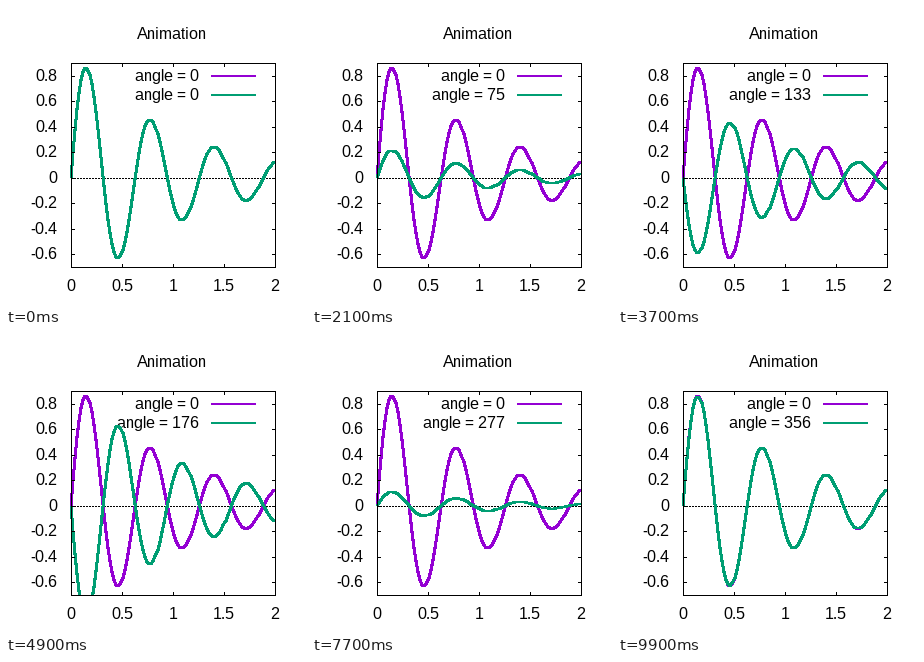
A matplotlib script for the animation above (10000 ms loop, 300x300 px).

```python
import numpy as np
import matplotlib.pyplot as plt
from matplotlib.animation import FuncAnimation
from matplotlib.patches import Rectangle

FRAMES = 100
INTERVAL = 100
PURPLE, GREEN = "#9400d3", "#009e73"
LEFT, TOP, SIDE = 65, 57, 204
RIGHT, BOTTOM = LEFT + SIDE, TOP + SIDE
TIC = 3

plt.rcParams.update({
    "font.family": "Liberation Sans",
    "text.hinting": "default",
    "text.hinting_factor": 1,
    "path.simplify": False,
})

fig = plt.figure(figsize=(3, 3), dpi=100, facecolor="white")
PX = 72 / fig.dpi  # one pixel in points

# Stage axes in pixel coordinates, y pointing down
ax = fig.add_axes([0, 0, 1, 1])
ax.set_xlim(0, 300)
ax.set_ylim(300, 0)
ax.axis("off")


def to_x(t):
    return np.round(LEFT + t * SIDE / 2)


def to_y(v):
    return np.round(TOP + (0.9 - v) * SIDE / 1.6)


def thick(xs, ys, color, **kw):
    return ax.plot(xs, ys, color=color, lw=2 * PX, aa=False, snap=False,
                   solid_capstyle="butt", solid_joinstyle="round", **kw)[0]


def thin(xs, ys):
    """One-pixel black line through pixel centres."""
    ax.plot(np.add(xs, 0.5), np.add(ys, 0.5), color="black", lw=PX, aa=False,
            snap=False, solid_capstyle="projecting",
            solid_joinstyle="miter", zorder=4)


def label(x, baseline, text, align):
    return ax.text(x, baseline, text, ha=align, va="baseline",
                   fontsize=16 * PX, color="black")


def wave_line(color, zorder):
    curve = thick(to_x(t), to_y(wave), color, zorder=zorder)
    curve.set_clip_path(Rectangle((LEFT - 1, TOP), SIDE + 2, SIDE + 1,
                                  transform=ax.transData))
    return curve


t = np.linspace(0, 2, 100)
wave = np.exp(-t) * np.sin(10 * t)

# Frame, tics and labels
thin([LEFT, RIGHT, RIGHT, LEFT, LEFT], [TOP, TOP, BOTTOM, BOTTOM, TOP])
for v in np.arange(-3, 5) / 5:
    y = to_y(v)
    thin([LEFT, LEFT + TIC], [y, y])
    thin([RIGHT - TIC, RIGHT], [y, y])
    label(51, y + 5, f"{v:g}", "right")
for v in np.arange(5) / 2:
    x = to_x(v)
    thin([x, x], [BOTTOM - TIC, BOTTOM])
    thin([x, x], [TOP, TOP + TIC])
    label(x, 285, f"{v:g}", "center")
ax.plot([LEFT, RIGHT], [to_y(0) + 0.5] * 2, color="black", lw=PX, aa=False,
        snap=False, dashes=(2, 2), dash_capstyle="butt", zorder=1)
label(166, 33, "Animation", "center")

# Key and curves
label(193, 75, "angle = 0", "right")
thick([205, 250], [70, 70], PURPLE)
wave_line(PURPLE, 2)
angle_text = label(193, 94, "", "right")
thick([205, 250], [89, 89], GREEN)
curve = wave_line(GREEN, 3)


def update(i):
    angle = 360 * i / FRAMES
    curve.set_ydata(to_y(wave * np.cos(np.radians(angle))))
    angle_text.set_text(f"angle = {int(angle)}")
    return curve, angle_text


anim = FuncAnimation(fig, update, frames=FRAMES, interval=INTERVAL,
                     repeat=True, repeat_delay=0)
plt.show()
```
